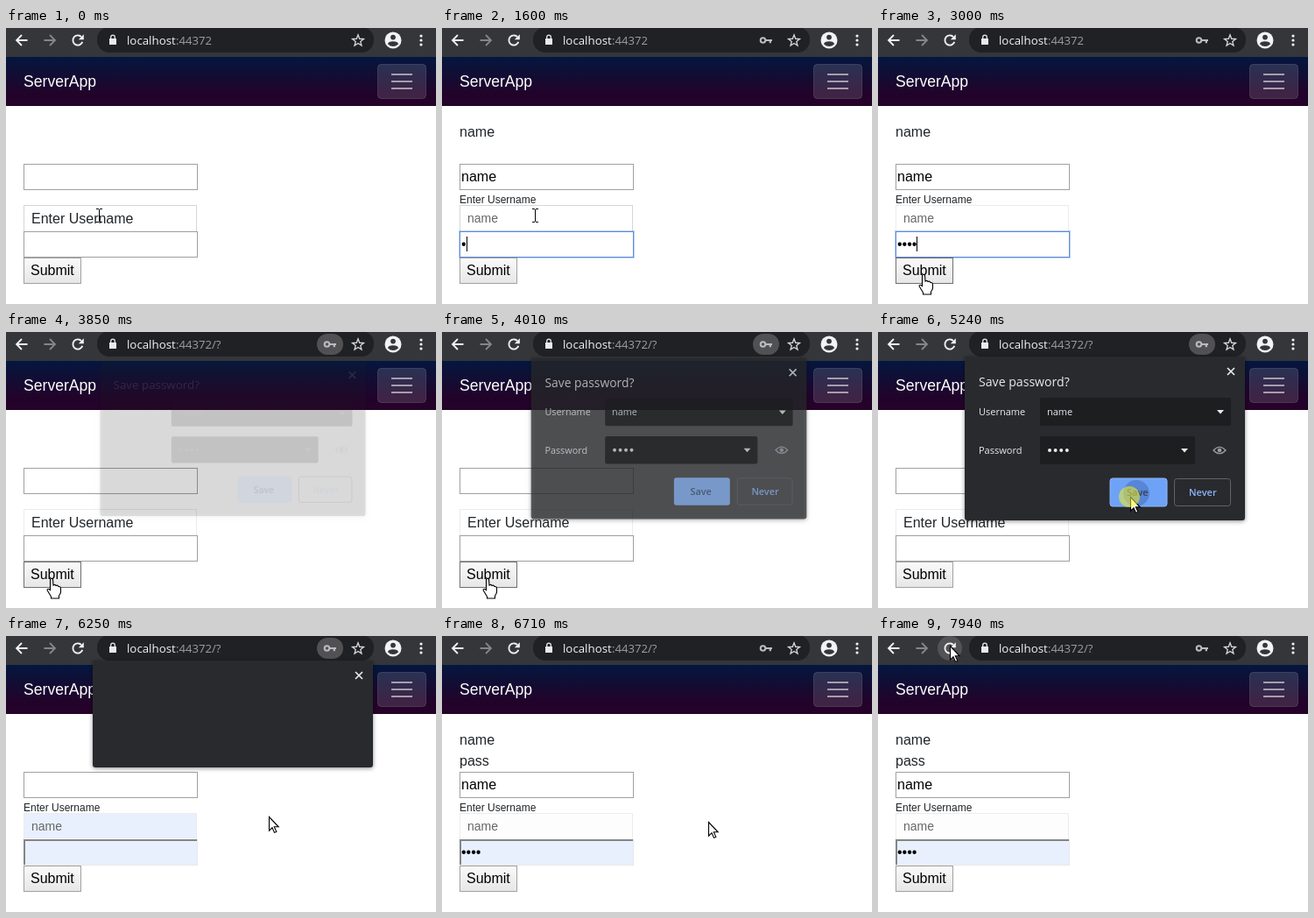
Write an HTML page with a canvas that moves like this. It is 491 px wide and 315 px high and loops after 8 s.

```html
<!DOCTYPE html>
<html lang="en">
<head>
<meta charset="utf-8">
<title>Login form</title>
<style>
html, body { margin: 0; width: 100%; height: 100%; overflow: hidden; background: #fff; }
canvas { display: block; width: 491px; height: 315px; }
</style>
</head>
<body>
<canvas id="stage" width="491" height="315"></canvas>
<script>
const ctx = document.getElementById('stage').getContext('2d');
const LOOP = 8000;
const PAGE = '"Liberation Sans", Arial, sans-serif';
const UI = '"Open Sans", "Noto Sans", sans-serif';
const INK = '#212529';

const clamp = v => Math.max(0, Math.min(1, v));
const mix = (a, b, p) => a + (b - a) * p;
const smooth = p => p * p * (3 - 2 * p);
const within = (t, a, b) => t >= a && t < b;
const countPast = (t, times) => times.filter(x => t >= x).length;

// Progress 0..1 that advances in n equal jumps, the last one at `end`.
function stepped(t, start, end, n) {
  if (t < start) return 0;
  return clamp((Math.floor((t - start) / ((end - start) / (n - 1)) + 0.02) + 1) / n);
}

function text(s, x, y, size, color, family = PAGE, weight = 400) {
  ctx.font = `${weight} ${size}px ${family}`;
  ctx.fillStyle = color;
  ctx.fillText(s, x, y);
}
function rect(x, y, w, h, color) {
  ctx.fillStyle = color;
  ctx.fillRect(x, y, w, h);
}
function frame(x, y, w, h, color) {
  ctx.strokeStyle = color;
  ctx.lineWidth = 1;
  ctx.strokeRect(x + .5, y + .5, w - 1, h - 1);
}
function pill(x, y, w, h, r, fill, stroke) {
  ctx.beginPath();
  ctx.roundRect(x, y, w, h, r);
  if (fill) { ctx.fillStyle = fill; ctx.fill(); }
  if (stroke) { ctx.strokeStyle = stroke; ctx.lineWidth = 1; ctx.stroke(); }
}
function disc(x, y, r, color) {
  ctx.beginPath();
  ctx.arc(x, y, r, 0, Math.PI * 2);
  ctx.fillStyle = color;
  ctx.fill();
}
function line(d, color, width = 1) {
  ctx.strokeStyle = color;
  ctx.lineWidth = width;
  ctx.stroke(new Path2D(d));
}
function fillPath(d, color) {
  ctx.fillStyle = color;
  ctx.fill(new Path2D(d));
}
function at(x, y, scale, draw) {
  ctx.save();
  ctx.translate(x, y);
  ctx.scale(scale, scale);
  draw();
  ctx.restore();
}

const moves = [
  { start: 2700, end: 3000, n: 5, from: [106, 214], to: [52, 281] },
  { start: 4470, end: 5160, n: 10, from: [52, 281], to: [288, 188] },
  { start: 6100, end: 6260, n: 3, from: [288, 188], to: [304, 212] },
  { start: 6940, end: 7710, n: 11, from: [304, 212], to: [82, 11] }
];
const clicks = [
  { start: 120, end: 200, x: 105, y: 213 },
  { start: 3460, end: 3620, x: 52, y: 281 },
  { start: 5240, end: 5320, x: 287, y: 188 },
  { start: 6330, end: 6480, x: 304, y: 212 }
];

function pointerAt(t) {
  let pos = moves[0].from;
  for (const m of moves) {
    if (t < m.start) break;
    const p = smooth(stepped(t, m.start, m.end, m.n));
    pos = m.from.map((v, i) => Math.round(mix(v, m.to[i], p)));
  }
  return { x: pos[0], y: pos[1] };
}
const inside = (p, x, y, w, h) => p.x >= x && p.x < x + w && p.y >= y && p.y < y + h;

function popupAlpha(t) {
  if (t < 3850 || t >= 6560) return 0;
  if (t < 4160) return [.12, .42, .72, .92][countPast(t, [3930, 4010, 4090])];
  return [1, .65, .3][countPast(t, [6410, 6480])];
}

function stateAt(t) {
  const submitted = t >= 3540;
  const saved = t >= 5320;
  const filled = t >= 6330;
  const typed = 'name'.slice(0, countPast(t, [810, 890, 970, 1130]));
  return {
    submitted, saved, filled,
    name: filled ? 'name' : submitted ? '' : typed,
    userField: saved ? 'name' : submitted ? '' : typed,
    dots: filled ? 4 : submitted ? 0 : countPast(t, [1600, 1680, 1750, 1920]),
    labelUp: saved ? 1 : submitted || t < 810 ? 0 : t < 890 ? .5 : 1,
    userCaret: within(t, 120, 660) || within(t, 810, 1280),
    passFocus: within(t, 1280, 3540),
    passCaret: within(t, 1280, 2470) || within(t, 2970, 3540),
    keyShown: t >= 1600,
    keyLit: within(t, 3850, 6560) ? 1 : within(t, 6560, 6710) ? .5 : 0,
    reloadLit: t >= 7940 ? 1 : t >= 7860 ? .5 : 0,
    popup: popupAlpha(t),
    pointer: pointerAt(t)
  };
}

function drawToolbar(s) {
  rect(0, 0, 491, 33, '#35363a');
  pill(104, -1, 316, 29, 14, '#202124');

  const back = 'M6.5 0H-6M0 -6L-6 0 0 6';
  at(18, 14, 1, () => line(back, '#f1f1f1', 1.8));
  at(50, 14, 1, () => { ctx.scale(-1, 1); line(back, '#85868a', 1.8); });

  if (s.reloadLit) disc(82, 14, 14, `rgba(255,255,255,${.15 * s.reloadLit})`);
  at(82, 14, 1, () => {
    ctx.beginPath();
    ctx.arc(0, 0, 5.6, .35, Math.PI * 1.75);
    ctx.strokeStyle = '#f1f1f1';
    ctx.lineWidth = 1.9;
    ctx.stroke();
    fillPath('M6.8 -6.8V-.8H.8Z', '#f1f1f1');
  });

  rect(118, 12, 8, 7, '#e8eaed');
  line('M119.7 12V10.5A2.3 2.3 0 0 1 124.3 10.5V12', '#e8eaed', 1.3);
  text('localhost', 138, 19, 13.3, '#f1f3f4', UI);
  text(':44372' + (s.submitted ? '/?' : ''), 194, 19, 13.1, '#9aa0a6', UI);

  if (s.keyLit) pill(355, 2, 30, 24, 12, `rgba(255,255,255,${.22 * s.keyLit})`);
  if (s.keyShown) {
    ctx.beginPath();
    ctx.arc(366.5, 14, 2.8, 0, Math.PI * 2);
    ctx.strokeStyle = '#b9bcc0';
    ctx.lineWidth = 2;
    ctx.stroke();
    line('M369 14H377M374.8 14V17.3', '#b9bcc0', 2.2);
  }

  ctx.beginPath();
  for (let i = 0; i < 10; i++) {
    const a = i * Math.PI / 5 - Math.PI / 2, r = i % 2 ? 2.9 : 6.8;
    ctx.lineTo(402 + r * Math.cos(a), 14.6 + r * Math.sin(a));
  }
  ctx.closePath();
  ctx.strokeStyle = '#d5d7da';
  ctx.lineWidth = 1.3;
  ctx.stroke();

  disc(442, 14, 9.5, '#f1f3f4');
  disc(442, 10.6, 2.9, '#35363a');
  fillPath('M436 18.4Q436.5 15.2 442 15.2T448 18.4Q442 23.5 436 18.4Z', '#35363a');
  for (const y of [9, 14, 19]) disc(474, y, 1.6, '#f1f3f4');
}

function drawNavbar() {
  const g = ctx.createLinearGradient(0, 33, 0, 89);
  g.addColorStop(0, '#03173e');
  g.addColorStop(.75, '#22032a');
  g.addColorStop(1, '#260229');
  rect(0, 33, 491, 56, g);
  text('ServerApp', 20, 67, 17.6, '#fff');
  pill(424.5, 41.5, 55, 39, 4, 'rgba(255,255,255,.13)', 'rgba(255,255,255,.14)');
  for (const y of [52, 60, 68]) rect(440, y, 24, 2, 'rgba(255,255,255,.55)');
}

function drawForm(s) {
  const p = s.pointer;
  if (s.name) text(s.name, 20, 124, 16, INK);
  if (s.filled) text('pass', 20, 148, 16, INK);

  frame(20, 155, 199, 30, '#a0a0a0');
  text(s.name, 22, 175, 16, '#000');

  const autofill = s.saved && !s.filled;
  rect(21, 203, 196, 28, autofill ? '#e8f0fe' : s.filled ? '#fdfdfd' : '#fff');
  frame(20, 202, 198, 31, inside(p, 20, 202, 198, 30) && !s.popup ? '#d6d6d6' : '#ececec');
  text(s.userField, 29, 222, 14, '#666');
  const up = s.labelUp;
  text('Enter Username', mix(29, 20, up), mix(223, 200, up), mix(16, 12, up), INK);
  if (s.userCaret) {
    ctx.font = `14px ${PAGE}`;
    rect(29 + Math.round(ctx.measureText(s.userField).width), 209, 1, 16, '#000');
  }

  if (s.saved) {
    rect(20, 232, 199, 30, '#e8f0fe');
    frame(20, 232, 199, 30, '#e8e8e8');
    rect(20, 232, 198, 2, '#858585');
    rect(20, 232, 2, 29, '#858585');
  } else {
    rect(20, 232, 199, 30, '#fff');
    frame(20, 232, 199, 30, s.passFocus ? '#5b8bd8' : '#a0a0a0');
    if (s.passFocus) frame(19, 231, 201, 32, 'rgba(90,145,230,.4)');
  }
  text('•'.repeat(s.dots), 22, 252, 16, '#000');
  if (s.passCaret) rect(22 + Math.round(s.dots * 5.6), 238, 1, 17, '#000');

  const g = ctx.createLinearGradient(0, 262, 0, 292);
  g.addColorStop(0, '#fafafa');
  g.addColorStop(1, '#e6e6e6');
  rect(20, 262, 66, 30, g);
  frame(20, 262, 66, 30, inside(p, 20, 262, 66, 30) ? '#707070' : '#a2a2a2');
  text('Submit', 28, 282, 16, '#000');
}

function drawPopup(s, t) {
  ctx.save();
  ctx.globalAlpha = s.popup;
  const scale = mix(.94, 1, s.popup);
  ctx.translate(259, 121.5);
  ctx.scale(scale, scale);
  ctx.translate(-259, -121.5);

  ctx.shadowColor = 'rgba(0,0,0,.45)';
  ctx.shadowBlur = 5;
  ctx.shadowOffsetY = 1;
  pill(99, 28, 320, s.saved ? 122 : 187, 3, '#292a2d');
  ctx.shadowColor = 'transparent';
  line('M399 41L407 49M407 41L399 49', '#e8eaed', 1.7);

  if (!s.saved) {
    text('Save password?', 115, 62, 14.1, '#e8eaed', UI);
    text('Username', 115, 95, 11, '#e8eaed', UI);
    text('Password', 115, 139, 11, '#e8eaed', UI);
    pill(185, 75, 218, 32, 2, '#1d1e20');
    pill(185, 119, 177, 32, 2, '#1d1e20');
    text('name', 193, 95, 11, '#e8eaed', UI);
    for (let i = 0; i < 4; i++) disc(196 + i * 6.6, 135, 2, '#e8eaed');
    fillPath('M387 89H395L391 93.5ZM346 133H354L350 137.5Z', '#e8eaed');
    line('M383 135Q390 127.5 397 135Q390 142.5 383 135Z', '#9aa0a6', 1.2);
    disc(390, 135, 2.3, '#9aa0a6');

    const hover = inside(s.pointer, 265, 167, 65, 32);
    pill(265, 167, 65, 32, 3, hover ? '#6ea2f7' : '#8ab4f8', hover ? '#8db7f9' : null);
    if (t >= 5240) disc(295, 184, 15, 'rgba(50,80,150,.35)');
    text('Save', 284, 187, 11, '#35434f', UI, 600);
    pill(338.5, 167.5, 64, 31, 3, null, '#5f6368');
    text('Never', 355, 187, 11, '#8ab4f8', UI, 600);
  }
  ctx.restore();
}

function drawPointer(s) {
  const p = s.pointer;
  const covered = s.popup > 0 && inside(p, 99, 28, 320, 187);
  const onText = !covered && (inside(p, 20, 155, 199, 30) || inside(p, 20, 202, 199, 60));
  const onButton = inside(p, 20, 262, 66, 30);
  at(p.x, p.y, 1, () => {
    if (onText) {
      line('M-3 -7.5H0M1 -7.5H4M.5 -7V7M-3 7.5H0M1 7.5H4', '#000');
      return;
    }
    const shape = onButton
      ? 'M-1.5 1.2Q0 -.6 1.5 1.2L2 8Q4 6.5 5 8.5Q7 7.5 8 9.5Q10.5 9 10.5 12V16Q10 18 8.5 20V23H-.5V21Q-3 17 -5 13.5Q-4.5 11 -1.5 13.5Z'
      : 'M.5 .5V16.2L4 12.8 6.5 18.4 8.8 17.4 6.3 11.8H11.2Z';
    fillPath(shape, '#fff');
    line(shape, '#000', 1.1);
  });
}

function draw(t) {
  const s = stateAt(t);
  rect(0, 0, 491, 315, '#fff');
  drawNavbar();
  drawForm(s);
  drawToolbar(s);
  if (s.popup) drawPopup(s, t);
  drawPointer(s);
  for (const c of clicks) {
    if (within(t, c.start, c.end)) disc(c.x, c.y, 12, 'rgba(245,240,40,.55)');
  }
}

function tick() {
  draw(performance.now() % LOOP);
  requestAnimationFrame(tick);
}
tick();
</script>
</body>
</html>
```
